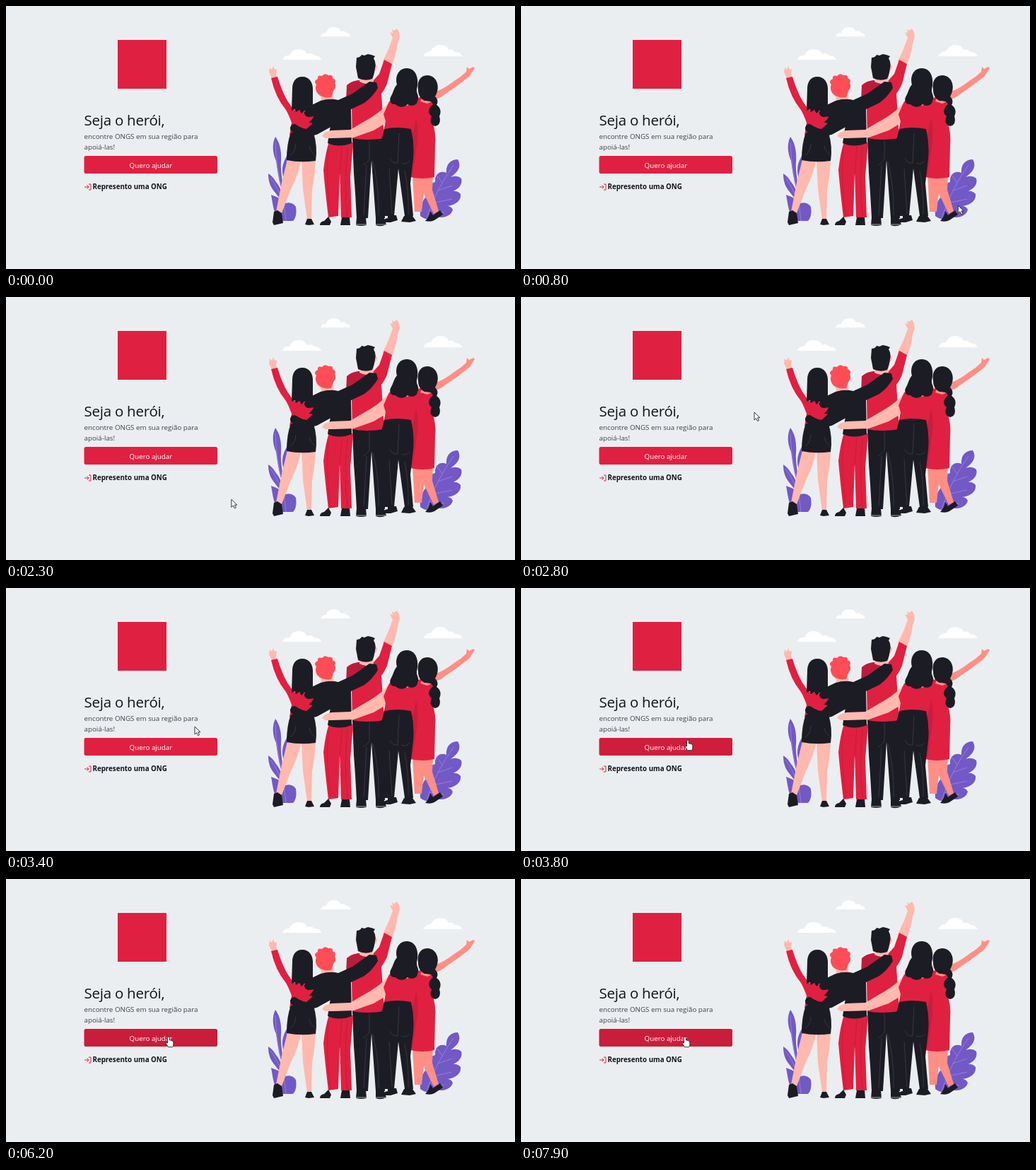
Animation, 720 px wide and 372 px high, one loop 8000 ms. Source, as an HTML page:

```html
<!DOCTYPE html>
<html lang="pt">
<head>
<meta charset="utf-8">
<title>Seja o herói</title>
<style>
html, body { margin: 0; width: 100%; height: 100%; overflow: hidden; background: #ebeef0 }
svg { display: block; width: 720px; height: 372px; font: 9.8px "Open Sans", "Noto Sans", sans-serif }
.red { fill: #e02041 } .deep { fill: #bd1b3c } .ink { fill: #1c1c25 } .white { fill: #fff }
.rose { fill: #ffb9ae } .coral { fill: #ff8e85 } .purple { fill: #7259c5 }
.line { fill: none; stroke: #4a4a55; stroke-width: .6 }
.vein { fill: none; stroke: #a99ae0; stroke-width: .6 }
.limb { fill: none; stroke-linecap: round; stroke-linejoin: round }
.pointer { fill: #fff; stroke: #222; stroke-width: .9; stroke-linejoin: round }
</style>
</head>
<body>
<svg viewBox="0 0 720 372">
  <rect class="red" x="158" y="48" width="69" height="69"/>

  <text x="110.5" y="169" font-size="20.5" font-weight="500" letter-spacing="-.25" fill="#13131a">Seja o herói,</text>
  <g fill="#41414d">
    <text x="110.5" y="187.5">encontre ONGS em sua região para</text>
    <text x="110.5" y="203">apoiá-las!</text>
  </g>
  <rect id="button" x="110.5" y="212" width="188.5" height="25" rx="2.5"/>
  <text class="white" x="174.5" y="228.5">Quero ajudar</text>
  <path d="M117 252h3v8h-3M111 256h6M114.5 253.5l2.5 2.5-2.5 2.5" fill="none" stroke="#e02041"/>
  <text x="122.5" y="259" font-weight="700" font-size="9.75" fill="#13131a">Represento uma ONG</text>

  <g class="white">
    <path d="M391 76q2-7 10-6 3-9 13-9 9 0 12 7 6-3 10 2 8 0 10 6z"/>
    <path d="M445 43q2-5 8-5 2-8 11-8 7 0 10 6 5-2 7 2 5 0 6 5z"/>
    <path d="M590 71q3-7 11-7 4-9 13-9 9 0 12 7 6-2 9 3 8 0 11 6z"/>
  </g>

  <!-- plants -->
  <g class="purple">
    <path d="M381 185c-5 10-4 23 1 34 2 14 4 30 9 44 1-18-3-28-2-42 1-14-1-27-8-36z"/>
    <path d="M401 206c-8 11-12 22-9 35l2 24c8-12 9-22 8-32 3-10 3-18-1-27z"/>
    <path d="M371 237c0 13 4 20 9 26l11 14c0-15-4-22-9-28-3-5-6-9-11-12z"/>
    <path d="M375 267c3 16 3 26 13 37h18c5-5 5-13 4-20-3-5-9-7-14-5-6-6-13-9-21-12z"/>
    <path d="M639 217c-11 0-17 8-16 19-9-4-17 2-16 13-9 2-11 11-8 18-10 4-14 18-13 30 7 6 17 6 23 1 12 3 21-2 23-10-2-4-5-5-8-5 14-2 20-9 19-17-4-5-10-5-14-3 13-4 17-12 15-19-4-4-10-4-15-2 10-7 16-15 10-25z"/>
  </g>
  <path class="vein" d="M381 193q1 36 10 68l5 43M401 215q-7 27-7 54M374 243q11 14 17 34M633 225q-25 35-38 75M617 250l-7-10M611 261l20-7M603 279l28-6M599 289l21 3"/>

  <!-- woman in the dress -->
  <path class="coral" d="M606 122q14-5 28-16 10-6 17-13l1-7 3 3 6-3 2 2-4 6q-3 6-8 9-15 12-29 21-11 9-18 8z"/>
  <path class="coral" d="M575 238h14l2 25-3 28h-10zM589 238h15l-1 22 9 30-7 4-15-31z"/>
  <path class="red" d="M577 133q13-8 29-4l4 14q-2 9-8 16 7 21 5 38l-1 45q-17 4-34 0l-5-47 4-38z"/>
  <path class="deep" d="M578 150q7 20 3 50l-6 39h-3l-4-40z" opacity=".6"/>
  <path class="coral" d="M590 127h11l4 7-9 4-10-3z"/>
  <path class="ink" d="M596 98c-10 0-15 9-13 20 0 8 3 13 9 16 5 1 9-1 12 5-7 6-8 12-2 17-3 6-2 12 5 14 7-1 8-8 6-14 3-6 2-12-4-16 3-5 1-9-2-12 9-15 1-30-11-30z"/>
  <path class="ink" d="M600 290l4 6 10-7 4 6-12 8q-5 3-13 1 6-6 7-14z"/>

  <!-- man in the middle -->
  <path class="rose" d="M533 78l8-17 6-16-4-8 4 1-1-5 3 2 4-3 3 5 1 7-3 9q-2 18-10 34l-6 13z"/>
  <path class="red" d="M482 113q5-7 17-8h21l8-9 7-20 11 6-7 28q-4 9-8 14l4 64q-20 5-45 0l-1-43z"/>
  <path class="deep" d="M482 112q10-8 23-7 12 4 18 1l-7 9-25 13-10 7z"/>
  <path class="rose" d="M501 94h18l1 13q-9 6-20 0zM495 84l4 9q-5-1-4-9zM522 82l3 3q0 6-5 8z"/>
  <path class="ink" d="M495 86l1-13q5 0 7-4l4 1 5-2q6 1 10 3l-2 3q4 6 2 14-1 9-4 15-10 4-20-1z"/>
  <path class="ink" d="M490 187q21 4 45 0 3 25 0 54l1 59h-13l-6-82-5 82h-16q-2-39-4-63z"/>
  <path class="line" d="M514 190v27q-6 7-9 8M510 225l-4 71M519 220q9 36 8 76"/>
  <path class="ink" d="M496 299h13l1 11q-8 2-15 0zM523 298h11l4 11q-8 4-15 1z"/>
  <path d="M495 309h15M523 309h14" stroke="#fff" stroke-width=".6"/>

  <!-- person with red hair -->
  <path class="red" d="M457 192l34 1-4 49 2 57h-15l-2-64-2 62-14 2q-5-42-7-67 3-25 8-40z"/>
  <path d="M475 199l-3 40M456 201q-4 45 3 96M483 200q-5 52 0 98" fill="none" stroke="#b81b39" stroke-width=".7"/>
  <path class="rose" d="M445 119h17l2 16-18 1z"/>
  <path class="ink" d="M445 134q13-4 25-1l20-9 24-17 10 1 2 8q-9 15-21 22l-17 8 1 48q-18 7-34 0l4-25-31 8q-16 0-17-14l7-16z"/>
  <path class="rose" d="M440 107l-2 9 6 12q10 3 16 0l5-15z"/>
  <path d="M441 124q-5-7-2-13-5-5 2-8-1-6 6-4 4-5 9-1 7-1 6 4 6 2 3 7 3 6-2 11l-3 9q-12 2-19-5z" fill="#ff4d57"/>
  <path class="ink" d="M456 298l4 7-2 5h-14q0-5 6-6zM475 299h11l1 11h-14z"/>

  <!-- woman on the left -->
  <path class="rose" d="M376 102l-4-8 1-7 3 3 2-5 2 5 3-1-1 8 2 6z"/>
  <path class="rose" d="M398 217h20q-5 23-15 42l-13 34-8-2 8-41zM418 217h20q-1 24-5 42l-1 43h-6l-6-43z"/>
  <path class="red" d="M375 102l9-2q6 20 14 34l9 13 20-3 12 5q-7 12-8 23l5 9-35 2 3-18q-4-11-8-18-15-18-21-45z"/>
  <path class="ink" d="M403 179h32q6 20 3 40-22 3-41-1 0-24 6-39z"/>
  <path class="limb" d="M408 173q13 9 30 3l20-11" stroke="#1c1c25" stroke-width="12"/>
  <path class="limb" d="M428 151q13-2 14 2 1 6-9 16" stroke="#1c1c25" stroke-width="12"/>
  <path class="red" d="M407 150q10 13 27 16l-9 8q-12-2-21-12z"/>
  <path class="rose" d="M413 136h15l2 10q-9 6-18 0z"/>
  <path class="ink" d="M419 100c-9 0-14 7-14 17l-1 31 5-2 1 4 5-3 3 5 4-4 5 3 2-4 5 2v-28c1-13-5-21-15-21z"/>
  <path class="line" d="M402 211q7-4 8-16M429 198q2 9 8 12"/>
  <path class="ink" d="M384 289l6 4 2 14-13 3-2-4 2-15zM426 301h6l4 8-8 1-5-1z"/>

  <!-- woman with long hair -->
  <path class="rose" d="M543 135q-12 14-27 23l-29 17-27 1-9 3-4 5 5 3 10 0 30-1 28-10 30-18 7-15z"/>
  <path class="red" d="M542 135q12-6 34-1l7 12-5 22-2 11q-23-3-42-2l3-14-3-10z"/>
  <path class="ink" d="M535 174q18-4 38 0 5 21 3 42l-4 35 4 46h-12l-9-67-6 67h-14l-3-61q-7-17-4-34z"/>
  <path class="line" d="M556 180l-2 42q-8 1-11-7M559 222q7 3 12-3M542 230l4 64M564 233q6 30 5 62"/>
  <path class="rose" d="M559 128h16l2 8-10 5-10-5z"/>
  <path class="ink" d="M567 88c-12 0-17 12-14 23-5 6-5 11-8 16-4 6-1 13 6 12 5 5 12 5 17 0 6 4 14 1 14-5 4-6-2-10-1-16 4-15-1-30-14-30z"/>
  <path class="ink" d="M540 296h12l2 7-10 3h-12q1-5 8-6zM563 297h12l5 7-9 2-12-1z"/>

  <path id="arrow" class="pointer" d="M0 0v11l2.6-2.4 2 4 2-1-2-3.8H8z"/>
  <path id="hand" class="pointer" d="M-1.5 9V1.2Q-1.5 0 0 0t1.3 1.3V5q1-.7 2 .5 1.3-.5 2 .6 1.6 0 1.6 1.8V11q0 2-1.4 3.7H-.5l-3.3-5Q-4 7.6-1.5 9z"/>
</svg>
<script>
const LOOP = 8000, HOVER = 3700;
const path = [ // time, x, y of the pointer tip
  [100, 676, 332], [900, 610, 275], [1400, 480, 285], [1500, 480, 285],
  [1800, 313, 318], [2400, 320, 280], [2600, 330, 163], [2800, 330, 163],
  [3600, 246, 207], [3700, 240, 213], [3800, 236, 215], [4300, 230, 224],
  [4500, 230, 224], [4700, 229, 219], [5000, 229, 219], [5200, 229, 222],
  [5800, 229, 222], [6000, 230, 223], [7400, 230, 223], [7500, 231, 223],
  [7800, 231, 223], [7900, 232, 223]
];
const [arrow, hand, button] = ["arrow", "hand", "button"].map(id => document.getElementById(id));
const mix = (a, b, p) => a + (b - a) * p;

function place(t) {
  const next = path.findIndex(k => k[0] > t);
  if (next < 1) return path[next ? path.length - 1 : 0].slice(1);
  const a = path[next - 1], b = path[next], p = (t - a[0]) / (b[0] - a[0]);
  return [mix(a[1], b[1], p), mix(a[2], b[2], p)];
}

function draw(now) {
  const t = Math.floor(now % LOOP / 100) * 100;
  const over = t >= HOVER;
  for (const shape of [arrow, hand]) shape.setAttribute("transform", `translate(${place(t)})`);
  arrow.style.display = t >= 100 && !over ? "" : "none";
  hand.style.display = over ? "" : "none";
  const light = 1 - .1 * Math.min(1, Math.max(0, (t - HOVER + 50) / 200));
  button.setAttribute("fill", `rgb(${[224, 32, 65].map(c => Math.round(c * light))})`);
  requestAnimationFrame(draw);
}
requestAnimationFrame(draw);
</script>
</body>
</html>
```
